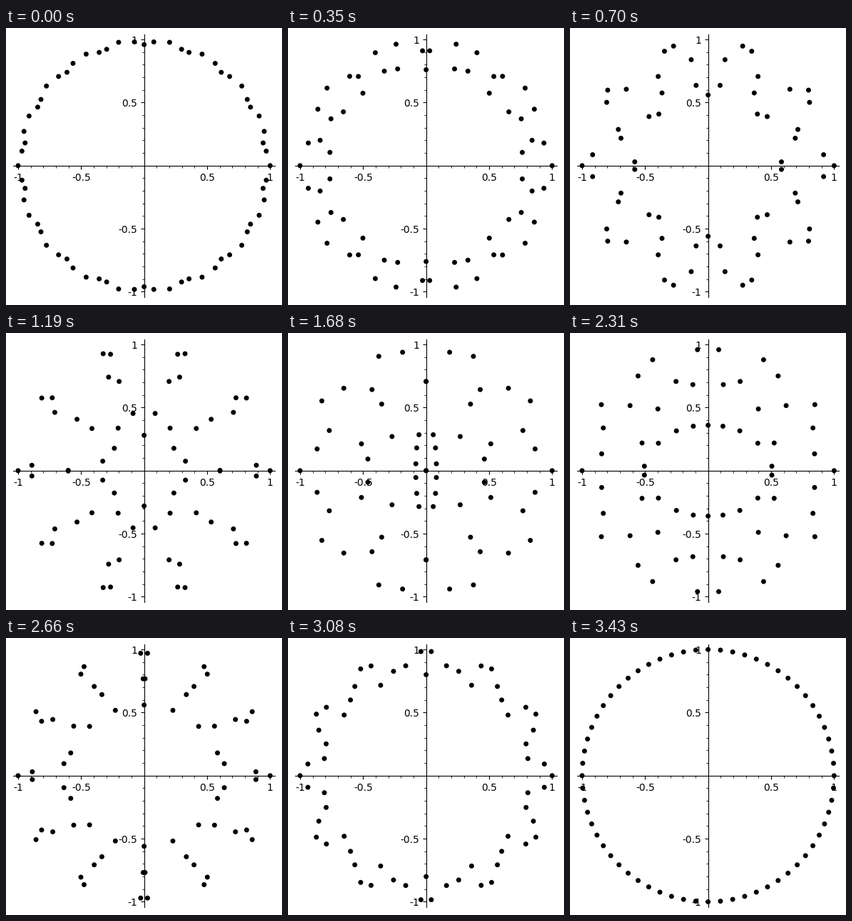
Write a matplotlib script that moves like this. It is 387x388 px and loops after 3.5 s.

```python
import numpy as np
import matplotlib.pyplot as plt
from matplotlib.animation import FuncAnimation
from matplotlib.ticker import MultipleLocator

WIDTH, HEIGHT, DPI = 387, 388, 100
FRAMES, INTERVAL = 50, 70
COUNT, POWER = 64, 19
LIMIT = 1.04
SIDE = 367.5
CENTER_X, CENTER_Y = 193.65, 195.2  # pixels from the lower left corner

plt.rcParams["font.family"] = "DejaVu Sans"

fig = plt.figure(figsize=(WIDTH / DPI, HEIGHT / DPI), dpi=DPI, facecolor="white")
ax = fig.add_axes([
    (CENTER_X - SIDE / 2) / WIDTH,
    (CENTER_Y - SIDE / 2) / HEIGHT,
    SIDE / WIDTH,
    SIDE / HEIGHT,
])
ax.set(xlim=(-LIMIT, LIMIT), ylim=(-LIMIT, LIMIT))

for side in ("left", "bottom"):
    ax.spines[side].set_position("zero")
for side in ("right", "top"):
    ax.spines[side].set_visible(False)

ticks = [-1, -0.5, 0.5, 1]
labels = [f"{tick:g}" for tick in ticks]
ax.set_xticks(ticks, labels)
ax.set_yticks(ticks, labels)
for axis in (ax.xaxis, ax.yaxis):
    axis.set_minor_locator(MultipleLocator(0.1))
ax.tick_params(labelsize=10)

# Each root of unity slides along a straight chord to its own power.
start = np.exp(2j * np.pi * np.arange(COUNT) / COUNT)
end = start ** POWER
dots = ax.scatter(start.real, start.imag, s=25, c="black",
                  edgecolors="none", zorder=5)


def update(frame):
    share = (frame + 1) / FRAMES
    z = (1 - share) * start + share * end
    dots.set_offsets(np.column_stack([z.real, z.imag]))
    return [dots]


anim = FuncAnimation(fig, update, frames=FRAMES, interval=INTERVAL,
                     repeat=True, repeat_delay=0)

plt.show()
```
